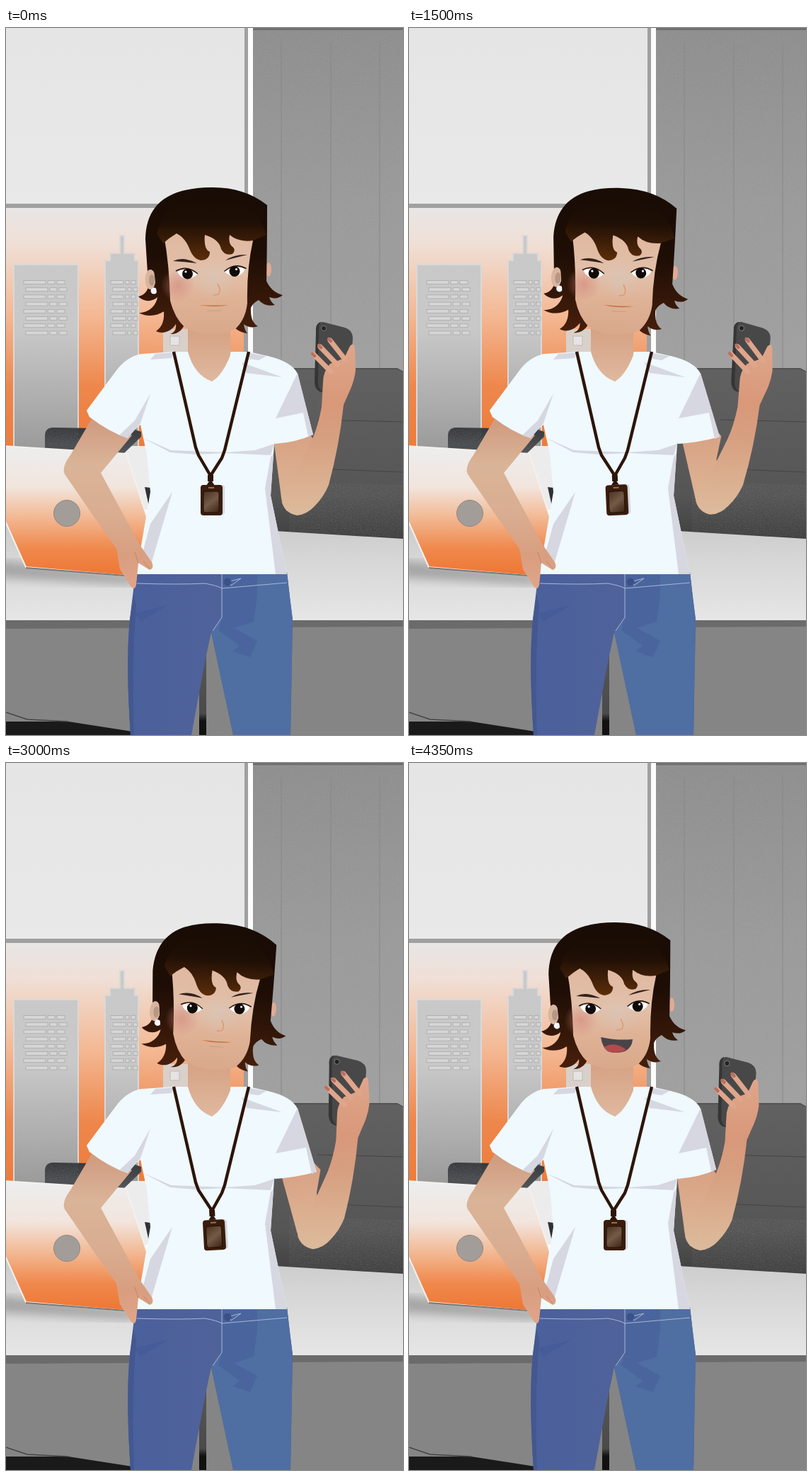
Recreate the animation shown at these times as an HTML page. Size 561 px wide and 998 px high, loop 4500 ms.

```html
<!DOCTYPE html>
<html lang="en">
<head>
<meta charset="utf-8">
<title>Office greeting</title>
<style>
html, body { margin: 0; width: 100%; height: 100%; overflow: hidden; }
svg { display: block; width: 100vw; height: 100vh; }
</style>
</head>
<body>
<svg viewBox="0 0 561 998" preserveAspectRatio="none">
<defs>
  <filter id="grain" x="0" y="0" width="1" height="1">
    <feTurbulence type="fractalNoise" baseFrequency=".8" numOctaves="2" seed="4"/>
    <feColorMatrix values="0 0 0 0 .5  0 0 0 0 .5  0 0 0 0 .5  1.6 0 0 0 -.7"/>
    <feComposite in2="SourceGraphic" operator="in"/>
  </filter>
  <filter id="soft"><feGaussianBlur stdDeviation="7"/></filter>
</defs>

<!-- Room -->
<path fill="url(#pane)" d="M0 0H349V250H0Z"/>
<path fill="url(#sky)" d="M0 252H349V620H0Z"/>
<path fill="url(#tower)" stroke="#d9d9d9" stroke-width="2" d="M11 334H102V600H11ZM140 328H147V318H161V293H167V318H182V328H187V600H140Z"/>
<path fill="#d9d0ca" d="M222 425H257V600H222Z"/>
<path fill="#e6e4e2" stroke="#bbb" d="M232 435H245V448H232Z"/>
<g id="windows" fill="#d6d6d6" stroke="#aaa" stroke-width=".8"></g>
<path fill="#a0a0a0" d="M0 248H337V0H342V480H336V254H0Z"/>
<path fill="#fcfcfc" d="M342 0H349V500H342Z"/>
<path fill="url(#wall)" d="M349 0H561V500H349Z"/>
<path fill="#707070" d="M349 0H561V3H349Z"/>
<path stroke="#858585" d="M389 20V480M459 20V480M528 20V480"/>
<path fill="url(#sofa)" d="M370 480H553L561 485V724L370 710Z"/>
<path stroke="#454444" fill="none" d="M400 481H553L561 485M440 553L561 556M440 622L561 627"/>
<path fill="#ececec" d="M150 590H230V680H150Z"/>
<path fill="url(#desk)" d="M0 680L380 710 561 721V838H0Z"/>
<path fill="#2f3134" d="M196 648L212 650V680H203Z"/>
<path fill="url(#chair)" d="M55 600V576Q55 564 67 564L180 566 191 570V577L165 602Z"/>
<path fill="#858585" d="M0 836H561V998H0Z"/>
<path fill="#6b6b6b" d="M0 836H561V845L0 848Z"/>
<path fill="url(#slot)" d="M273 846H283V998H273Z"/>
<path fill="#1a1a1a" d="M0 979H88L178 993V998H0Z"/>
<path fill="none" stroke="#444" stroke-width="1.5" d="M0 966L30 976 88 979"/>
<path fill="#555" opacity=".4" filter="url(#soft)" d="M-10 752L180 772V786L-10 776Z"/>
<path fill="url(#lid)" stroke="#f4f1ee" stroke-width="2" d="M-2 590L170 601 206 712 180 774 28 761-2 694Z"/>
<path stroke="#777" stroke-width="2" d="M28 762L180 774"/>
<circle cx="86" cy="685" r="18.5" fill="#a39d9a" stroke="#8d8784"/>
<path filter="url(#grain)" opacity=".3" d="M349 3H561V480H349ZM12 470H102V590H12ZM140 470H187V570H140ZM400 640L561 645V720L400 711Z"/>

<!-- Raised arm -->
<path id="upper" fill="url(#skinUpper)" d="M374 550H412L434 580 424 612 428 665 397 682Q389 672 388 655Z"/>
<g id="fore">
  <path fill="#353536" d="M444 415Q437 418 438 428L436 500Q437 513 447 514H462V425Z"/>
  <path fill="#484849" d="M448 415L479 423Q491 427 490 439L485 500Q482 514 471 514H450Q440 511 441 499L442 424Q442 415 448 415Z"/>
  <circle cx="449" cy="424" r="3.5" fill="#222" stroke="#777"/>
  <path fill="url(#skinFore)" d="M389 655Q392 640 412 625L433 580Q441 562 446 535L448 500Q448 485 458 474L478 466 486 449Q492 443 493 452L494 483Q492 500 484 516L477 532Q471 590 456 645 449 662 436 675 425 687 411 688 395 685 390 670Z"/>
  <path stroke="#dfa68b" stroke-width="7" stroke-linecap="round" d="M435 461L459 485M444 450L468 475M458 441L480 469"/>
  <path stroke="#b96f62" stroke-width="4.5" stroke-linecap="round" d="M433 460L436 463M442 448L445 451M456 439L459 442"/>
</g>

<!-- Trousers -->
<path fill="url(#denim)" d="M183 768H397L401 803 405 835 402 998H321L290 853 281 895 262 998H176Q169 890 175 835Z"/>
<path fill="#4f6ea2" d="M305 768H397L401 803 405 835 402 998H321L290 853 305 834Z"/>
<path fill="#435890" d="M180 800L175 835Q169 900 176 998H181Q177 900 184 815Z"/>
<path fill="#465c98" d="M182 826L230 814 190 838Z"/>
<path fill="#4a659d" d="M305 772H355V800L350 838 322 847 355 865 345 888 320 880 330 872 300 850 305 834Z"/>
<path fill="none" stroke="#a9b7d8" d="M185 784Q245 786 281 784 298 787 305 791L397 783M305 771V832L292 851M332 777L318 787 316 781Z"/>
<circle cx="313" cy="782" r="5.5" fill="#3c5189"/>

<!-- Shirt -->
<path fill="#eff9fe" d="M237 457L192 460Q170 464 155 485L114 540 118 549 166 580 190 560 199 602 204 655 184 771H397L374 660 379 588 412 488 370 463 343 457H318L291 499 258 457Z"/>
<path id="sleeve" fill="#eff9fe"/>
<path id="sleeveShade" fill="#d6d7e0"/>
<g fill="#d6d7e0">
  <path d="M237 458L211 460 204 468 234 466ZM344 459L368 463 357 469 344 467ZM333 472L390 493 340 487Z"/>
  <path d="M379 587L374 603 310 600 268 602 232 599 192 578 233 596 310 599 352 596Z"/>
  <path d="M378 600L374 660 397 771H381L366 650 374 606ZM235 655L204 760 190 752 204 700Z"/>
</g>

<!-- Arm on hip -->
<path fill="url(#skinHip)" d="M125 545L91 603Q78 620 83 630L125 691 156 735 161 764 176 788Q182 795 184 786L187 755 203 765Q210 763 206 754L188 728 134 628 178 575Z"/>
<path fill="none" stroke="#c0866d" d="M187 755L182 740M203 763L194 752"/>
<path fill="#eff9fe" d="M192 460Q170 464 155 485L114 540 118 549Q145 570 172 579L196 545Z"/>
<path fill="#d6d7e0" d="M204 516L190 558 172 579 160 575 182 554Z"/>

<!-- Lanyard, neck -->
<path fill="url(#skinNeck)" d="M257 405H317V462Q306 490 291 499 266 490 257 457Z"/>
<path id="rope" fill="none" stroke="#2c1509" stroke-width="4.4" stroke-linejoin="round"/>
<g id="tag">
  <path fill="#2c1509" d="M285 631H293V640H291L295 646H283L287 640H285Z"/>
  <rect x="278" y="645" width="31" height="42" rx="4" fill="#d6d7e0"/>
  <rect x="275" y="645" width="31" height="43" rx="4" fill="#3a1c0b"/>
  <path stroke="#8a7260" stroke-width="2" d="M286 649H294"/>
  <rect x="279" y="654" width="22" height="30" rx="3" fill="url(#card)" stroke="#1f0f06"/>
</g>

<!-- Head -->
<g id="head">
  <ellipse cx="371" cy="341" rx="4" ry="10" fill="#dfab94"/>
  <path fill="url(#hair)" d="M289 225C235 226 198 244 197 298L200 345C205 364 200 376 187 379 195 387 206 387 214 380 212 392 202 402 188 402 198 408 213 407 223 400 224 412 221 422 212 428 222 433 234 428 240 418 241 425 238 430 232 432 243 433 251 425 254 414L318 412Q322 429 341 431 337 426 336 418 345 425 356 421 345 415 346 395 349 388 357 384 366 394 380 391 374 387 372 380 383 384 391 377 375 373 368 357 369 310 369 250 336 224 289 225Z"/>
  <ellipse cx="204" cy="355" rx="7.5" ry="14" fill="#d9b5a0"/>
  <ellipse cx="206" cy="356" rx="4" ry="8" fill="#b79884"/>
  <circle cx="209" cy="371" r="4.5" fill="#f5f7fa"/>
  <path fill="url(#hair)" d="M205 290H240V412L222 400 213 374Q207 330 205 290Z"/>
  <path fill="url(#face)" d="M223 292Q231 335 232 385 238 409 253 423 270 432 289 432 313 432 325 424 339 410 341 388 340 340 349 300L290 270Z"/>
  <circle cx="243" cy="363" r="24" fill="url(#blush)"/>
  <circle cx="294" cy="354" r="30" fill="url(#shine)"/>
  <path fill="url(#fringe)" d="M222 304Q231 296 241 290 253 296 259 311 265 327 276 328 288 327 288 316 279 313 281 292 301 298 304 312 309 322 320 319 326 313 319 308 314 303 316 292 329 303 349 300L368 292Q350 235 289 232 225 236 213 290Z"/>
  <path fill="#34231b" d="M236 329Q251 322 270 332 251 330 236 329ZM310 328Q323 319 341 320 325 324 310 328Z"/>
  <g id="eye">
    <path fill="#fff" d="M242 344Q256 335 271 347 263 355 253 354 245 351 242 344Z"/>
    <path fill="none" stroke="#2b1710" stroke-width="1.6" d="M240 343Q256 334 271 347"/>
    <circle cx="256.500" cy="347" r="7.500" fill="#100a08"/>
    <circle cx="254" cy="344" r="1.600" fill="#fff"/>
  </g>
  <use href="#eye" transform="matrix(-1 0 0 1 579.500 -3.500)"/>
  <path fill="none" stroke="#df9a72" stroke-width="1.6" d="M299 361Q305 371 300 376L293 377"/>
  <g id="closed">
    <path fill="#c9693f" d="M272 391Q294 392 315 391 296 395 272 391Z"/>
    <path stroke="#c99c7c" d="M284 399H304"/>
  </g>
  <g id="open">
    <path fill="#494347" d="M271 387Q293 392 316 390 315 402 305 407 292 411 281 407 273 401 271 387Z"/>
    <path fill="#b24c4c" d="M275 401Q291 392 307 405 291 412 281 407Z"/>
  </g>
</g>
</svg>
<script>
const NS = "http://www.w3.org/2000/svg";
const $ = id => document.getElementById(id);

function add(parent, tag, attrs) {
  const node = document.createElementNS(NS, tag);
  for (const key in attrs) node.setAttribute(key, attrs[key]);
  return parent.appendChild(node);
}

// Stops are "offset colour" pairs.
function gradient(id, type, box, stops) {
  const node = add(document.querySelector("defs"), type + "Gradient",
    { id, gradientUnits: "userSpaceOnUse", ...box });
  for (const stop of stops.split(", ")) {
    const [offset, color] = stop.split(" ");
    add(node, "stop", { offset, "stop-color": color });
  }
}
const vertical = (id, y1, y2, stops) => gradient(id, "linear", { x1: 0, x2: 0, y1, y2 }, stops);
const radial = (id, cx, cy, r, stops) => gradient(id, "radial", { cx, cy, r }, stops);

vertical("pane", 0, 250, "0 #e5e5e5, 1 #e9e9e9");
vertical("sky", 254, 590, "0 #e8e6e5, .15 #f0dfd6, .45 #f4b893, .75 #ee874c, 1 #ee7c3a");
vertical("tower", 293, 590, "0 #c9c9c9, .45 #c8c8c8, .8 #acacac, 1 #9a9a9a");
vertical("wall", 0, 480, "0 #8e8e8e, .5 #9a9a9a, 1 #a0a0a0");
vertical("sofa", 480, 720, "0 #626161, .6 #595858, .75 #565555, 1 #414040");
vertical("desk", 690, 836, "0 #c9c9c9, .4 #d6d6d6, 1 #e6e6e6");
vertical("chair", 564, 600, "0 #36393c, 1 #54575a");
vertical("slot", 846, 998, "0 #5c5c5c, .8 #4a4a4a, .87 #111, 1 #111");
vertical("lid", 595, 770, "0 #ededed, .3 #f2e5dd, .55 #f2b892, .8 #f0884c, 1 #ee7836");
vertical("skinUpper", 575, 680, "0 #d9a184, .5 #dbad8e, 1 #dcb698");
vertical("skinFore", 440, 690, "0 #dfa78c, .35 #d9987a, .55 #d69f80, .85 #dbb393, 1 #dcbb9d");
vertical("skinHip", 560, 790, "0 #d09d82, .25 #dab498, .55 #d9ad91, .8 #d99e80, 1 #e0a58a");
vertical("skinNeck", 425, 500, "0 #d6a283, 1 #dfb9a0");
vertical("face", 290, 432, "0 #e0b8a0, .4 #e2c0aa, .65 #dfb296, 1 #d9a88a");
vertical("hair", 225, 430, "0 #180c04, .45 #1d0d05, 1 #471f0b");
vertical("fringe", 240, 328, "0 #180c04, .4 #1f0f05, 1 #5c2d0a");
gradient("denim", "linear", { x1: 172, x2: 305, y1: 0, y2: 0 }, "0 #4a609c, 1 #50629a");
gradient("card", "linear", { x1: 279, x2: 301, y1: 654, y2: 684 }, "0 #4b311f, .5 #735b48, 1 #3d2212");
radial("blush", 243, 363, 24, "0 #d4877ba0, 1 #d4877b00");
radial("shine", 294, 354, 30, "0 #d6c6b8a0, 1 #d6c6b800");

for (let row = 0; row < 8; row++) {
  const y = 356.5 + row * 10.2, shift = row % 2 * 3;
  for (const [x, w] of [[25, 31], [59, 10], [72, 11], [148, 18], [169, 5], [177, 6]])
    add($("windows"), "rect", { x: x + shift, y, width: w, height: 5 });
}

// Eased interpolation through [time, value] keys.
function track(t, keys) {
  if (t <= keys[0][0]) return keys[0][1];
  for (let i = 1; i < keys.length; i++) {
    const [t0, a] = keys[i - 1], [t1, b] = keys[i];
    if (t < t1) return a + (b - a) * (1 - Math.cos(Math.PI * (t - t0) / (t1 - t0))) / 2;
  }
  return keys[keys.length - 1][1];
}

const LOOP = 4500, STEP = 150, GESTURE = 2470, TALK = 500;
const DEG = 180 / Math.PI;
const setTurn = (id, angle, x, y, dx = 0, dy = 0) =>
  $(id).setAttribute("transform", `translate(${dx} ${dy}) rotate(${angle} ${x} ${y})`);

function draw(now) {
  const t = Math.floor(now % LOOP / STEP) * STEP;
  const phase = t % GESTURE;
  const lean = track(phase, [[0, 0], [700, 1], [1150, 1], [1950, 0]]);
  const wave = 43 * track(phase, [[100, 0], [1020, 1], [1940, 0]]);
  const swing = track(phase, [[0, 0], [380, 1], [870, -.5], [1340, 1], [1700, 0]]);

  setTurn("head", 4.6 * lean, 275, 445);

  const elbow = 26 * lean;
  setTurn("upper", -elbow / 165 * DEG, 395, 500);
  setTurn("fore", (wave - elbow) / 200 * DEG, 408, 665, elbow, -2 * lean);

  const pull = Math.min(1, lean / .6);
  const tipX = 434 + 5 * pull, tipY = 574 + 3 * pull;
  $("sleeve").setAttribute("d", `M370 463Q404 471 412 488L${tipX} ${tipY}Q410 585 380 587L360 520Z`);
  $("sleeveShade").setAttribute("d", `M412 487L381 551 ${420 + 4 * pull} 543 ${tipX - 7} ${tipY + 3} ${tipX} ${tipY}Z`);

  const angle = -4.7 * swing;
  const knotX = 289 - 37 * angle / DEG;
  setTurn("tag", angle, 288, 595);
  $("rope").setAttribute("d", `M237 457L268 592 272 603 ${knotX} 632 305 607 309 596 343 457`);

  const talking = t % TALK >= 300;
  $("open").style.display = talking ? "" : "none";
  $("closed").style.display = talking ? "none" : "";
}

const start = performance.now();
(function frame() {
  draw(performance.now() - start);
  requestAnimationFrame(frame);
})();
</script>
</body>
</html>
```
